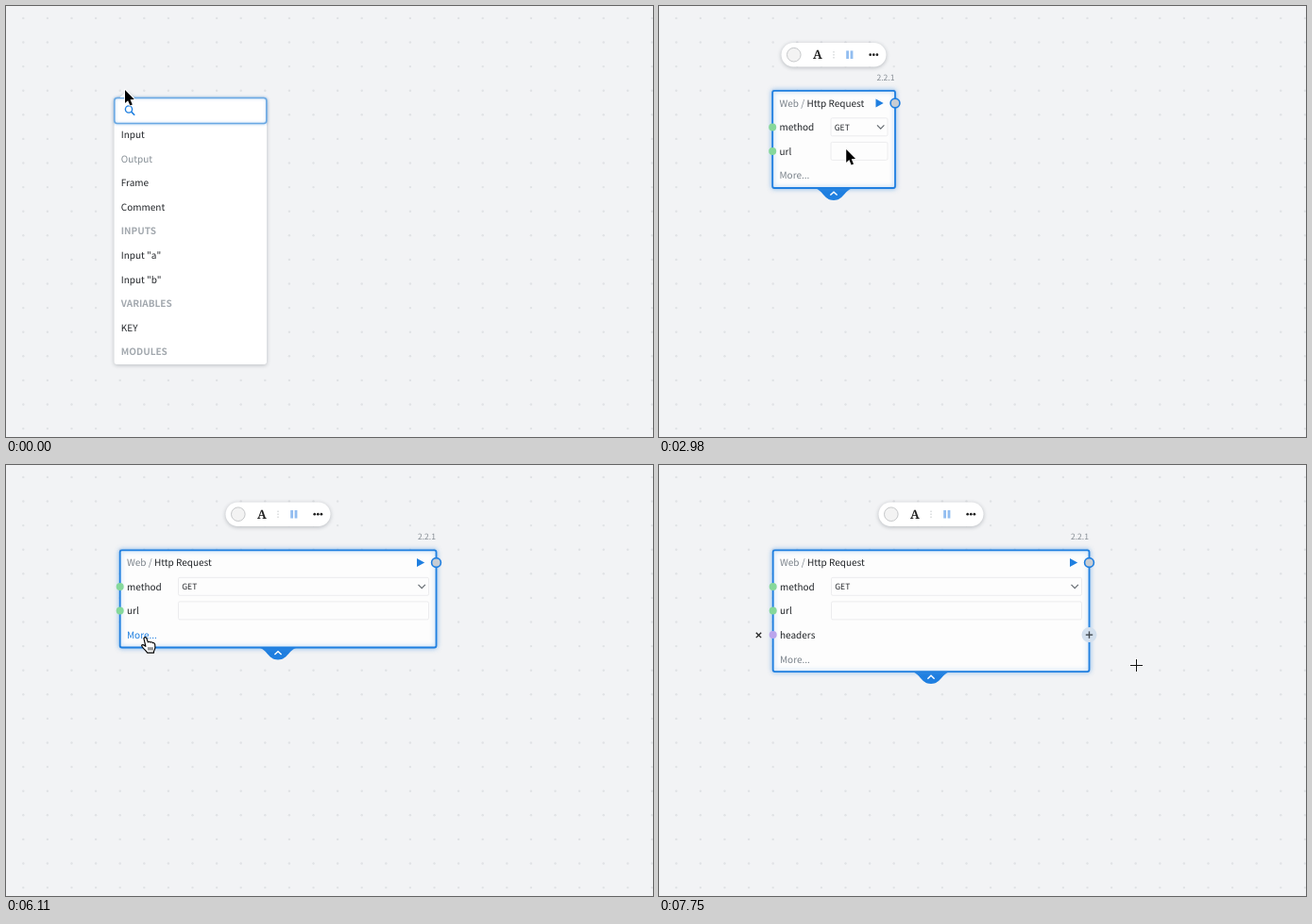
An HTML page with a canvas that plays this animation: 685 px wide and 457 px high, repeating every 8 s.

```html
<!DOCTYPE html>
<html lang="en">
<head>
<meta charset="utf-8">
<title>Node editor</title>
<style>
  html, body { margin: 0; width: 100%; height: 100%; overflow: hidden; background: #f2f3f5; }
  canvas { display: block; width: 685px; height: 457px; }
</style>
</head>
<body>
<canvas id="stage"></canvas>
<script>
const W = 685, H = 457, LOOP = 8000, ROW = 25.6;
const BLUE = '#1f7fe0', DARK = '#222529', GREY = '#7a828a', PALE = '#a2a8ae';
const SANS = '"Noto Sans CJK JP", "Noto Sans CJK SC", "Noto Sans CJK", "Noto Sans", sans-serif';
const canvas = document.getElementById('stage');
const ctx = canvas.getContext('2d');
const dpr = window.devicePixelRatio || 1;
canvas.width = Math.round(W * dpr);
canvas.height = Math.round(H * dpr);

// ---------- helpers ----------

// Text centred on y; parts between asterisks are bold. Returns the end x.
function text(str, x, y, { size = 10, color = DARK, bold = false, right = false, gap = 0 } = {}) {
  ctx.fillStyle = color;
  ctx.wordSpacing = gap + 'px';
  str.split('*').forEach((part, i) => {
    ctx.font = `${bold || i % 2 ? 700 : 400} ${size}px ${SANS}`;
    const w = ctx.measureText(part).width;
    ctx.fillText(part, right ? x - w : x, y + size * 0.38);
    x += w;
  });
  ctx.wordSpacing = '0px';
  return x;
}

function box(x, y, w, h, r, fill, stroke, line = 1) {
  ctx.beginPath();
  ctx.roundRect(x, y, w, h, r);
  paint(fill, stroke, line);
}

function disc(x, y, r, fill, stroke, line = 1) {
  ctx.beginPath();
  ctx.arc(x, y, r, 0, Math.PI * 2);
  paint(fill, stroke, line);
}

function paint(fill, stroke, line) {
  if (fill) { ctx.fillStyle = fill; ctx.fill(); }
  if (stroke) { ctx.strokeStyle = stroke; ctx.lineWidth = line; ctx.stroke(); }
}

function poly(points, fill, stroke, line, close = true) {
  ctx.beginPath();
  points.forEach(([x, y]) => ctx.lineTo(x, y));
  if (close) ctx.closePath();
  paint(fill, stroke, line);
}

function shadow(color, blur, dy, draw) {
  ctx.save();
  ctx.shadowColor = color;
  ctx.shadowBlur = blur * dpr;
  ctx.shadowOffsetY = dy * dpr;
  draw();
  ctx.restore();
}

const mix = (a, b, u) => a + (b - a) * u;
const easeOut = u => 1 - (1 - u) * (1 - u);

// Progress in n held steps, the first one landing at start.
function steps(t, start, end, n) {
  if (t < start) return 0;
  const k = Math.floor((t - start + 1) / ((end - start) / (n - 1))) + 1;
  return Math.min(1, k / n);
}

function curve(a, c, b, u) {
  return [0, 1].map(i => mix(mix(a[i], c[i], u), mix(c[i], b[i], u), u));
}

const line = (a, b, u) => [mix(a[0], b[0], u), mix(a[1], b[1], u)];

// ---------- cursors ----------

const cursors = {
  arrow() {
    const shape = [[0, 0], [0, 14], [3.1, 11.2], [5.4, 16.5], [7.8, 15.5], [5.5, 10.3], [9.8, 10]];
    poly(shape, '#000', '#fff', 1.8);
    poly(shape, '#000');
  },
  cross() {
    ctx.fillStyle = 'rgba(255,255,255,.8)';
    ctx.fillRect(-7, -1, 14, 3);
    ctx.fillRect(-1, -7, 3, 14);
    ctx.fillStyle = '#111';
    ctx.fillRect(-6, 0, 13, 1);
    ctx.fillRect(0, -6, 1, 13);
  },
  hand() {
    ctx.beginPath();
    ctx.moveTo(-1.6, 1.2);
    ctx.quadraticCurveTo(-0.3, -1, 1.2, 0.7);
    ctx.lineTo(2.8, 5.2);
    ctx.quadraticCurveTo(4, 3.9, 5.3, 5.3);
    ctx.quadraticCurveTo(6.9, 4.5, 8, 6);
    ctx.quadraticCurveTo(9.8, 5.5, 10.2, 7.6);
    ctx.lineTo(10.4, 11);
    ctx.quadraticCurveTo(10, 13.5, 9, 14.8);
    ctx.lineTo(9, 16.4);
    ctx.lineTo(2.2, 16.4);
    ctx.quadraticCurveTo(0.5, 14, -1.5, 12.2);
    ctx.quadraticCurveTo(-3.8, 9.8, -3.9, 8.5);
    ctx.quadraticCurveTo(-2.6, 7.3, -0.8, 8.8);
    ctx.lineTo(0.4, 9.6);
    ctx.closePath();
    paint('#fff', '#000', 1.15);
    for (const x of [3.4, 5.4, 7.4]) poly([[x, 10.5], [x + 0.1, 13.8]], null, '#000', 0.8, false);
  }
};

function cursorAt(t) {
  if (t < 1790) {
    const u = steps(t, 600, 890, 3);
    return ['arrow', ...(t < 1640 ? line([126, 89], [159, 113], easeOut(u)) : [159, 116])];
  }
  if (t < 2980) return ['arrow', ...line([159, 116], [175, 140], steps(t, 2090, 2530, 4))];
  if (t < 4170) return ['arrow', ...line([175, 140], [251, 179], easeOut(steps(t, 2980, 3720, 6)))];
  if (t < 5520) return ['cross', ...curve([270, 180], [498, 184], [461, 183], dragAt(t))];
  if (t < 6410) {
    const u = steps(t, 5520, 6110, 5);
    return [u < 1 ? 'arrow' : 'hand', ...line([461, 183], [147.5, 182.7], easeOut(u))];
  }
  if (t < 7750) {
    const p = curve([147, 180], [590, 290], [504, 213], steps(t, 6710, 7300, 5));
    return [p[0] > 456 ? 'hand' : 'arrow', ...p];
  }
  return ['cross', 505, 212];
}

function dragAt(t) {
  return steps(t, 4320, 5070, 6);
}

function drawCursor([kind, x, y]) {
  ctx.save();
  ctx.translate(kind === 'cross' ? Math.round(x) : x, kind === 'cross' ? Math.round(y) : y);
  ctx.lineJoin = 'round';
  cursors[kind]();
  ctx.restore();
}

// ---------- scene ----------

function grid() {
  ctx.fillStyle = '#f2f3f5';
  ctx.fillRect(0, 0, W, H);
  for (let x = 18.3; x < W; x += ROW)
    for (let y = 12.9; y < H; y += ROW) disc(x, y, 1.2, '#e0e2e5');
}

const START = ['Input', '-Output', 'Frame', 'Comment', '#INPUTS', 'Input "a"', 'Input "b"', '#VARIABLES', 'KEY', '#MODULES'];
const ROUGH = [
  ['Web / Http *Re*quest', 'fetch'],
  ['Web / Fetch', 'http *re*quest'],
  ['Array / *Re*verse', 'flip order'],
  ['Array / *Re*duce', 'fold accumulate'],
  ['Text / *Re*place', 'substitute'],
  ['Math / *R*ound', 'nearest whole number'],
  ['Logic / Compa*re*', '']
];
const FOUND = [
  ['Web / Http *Req*uest', 'fetch'],
  ['Web / Fetch', 'http *req*uest'],
  ['A*r*ray / Slic*e*', 'subsequence sublist'],
  ['Logic / Compa*re*', 'compare greater less than equals']
];

function results(list) {
  list.forEach(([name, hint], i) => {
    const y = 136.3 + i * 38.4;
    text(name, 121.8, y);
    text(hint, 121.8, y + 13, { size: 8.5, color: '#8c9298', gap: 1.1 });
  });
}

function search(t) {
  const query = t < 1190 ? '' : t < 1340 ? 'r' : t < 1640 ? 're' : 'req';
  const found = query === 'req';
  const bottom = found ? 277 : 380;
  shadow('rgba(40,50,60,.28)', 4, 1, () => {
    box(114.5, 98, 161.5, bottom - 98, 3, '#fff');
    poly([[119.5, 98], [128, 90.5], [136.5, 98]], '#fff');
  });
  ctx.save();
  ctx.beginPath();
  ctx.rect(115, 97, 161, bottom - 97);
  ctx.clip();
  if (found) {
    ctx.fillStyle = '#f1f2f4';
    ctx.fillRect(115, 125, 161, 37);
    results(FOUND);
  } else if (query) {
    results(ROUGH);
  } else {
    START.forEach((s, i) => {
      const head = s[0] === '#', off = s[0] === '-';
      const color = head ? PALE : off ? '#858e95' : DARK;
      text(s.replace(/^[#-]/, ''), 121.8, 136.2 + i * ROW, { color, bold: head });
    });
  }
  ctx.restore();
  shadow('rgba(60,140,220,.4)', 3, 0, () => box(114.8, 97.6, 161, 27, 3, '#fff', '#69a8e3', 1.5));
  poly([[120.5, 97], [128, 90.5], [135.5, 97]], '#fff');
  disc(130, 109.5, 3.6, null, BLUE, 1.4);
  poly([[132.6, 112.1], [136.2, 115.7]], null, BLUE, 1.6, false);
  if (query) {
    const end = text(query, 144, 110.8);
    ctx.fillStyle = '#111';
    ctx.fillRect(end, 104.5, 1, 12.5);
  }
}

function toolbar(cx) {
  const y = 51.7;
  shadow('rgba(40,50,60,.3)', 4, 1, () => box(cx - 55.5, 39, 111, 25.6, 12.8, '#fff'));
  disc(cx - 42.2, y, 7.3, '#f3f3f3', '#c6c8ca');
  ctx.fillStyle = '#222';
  ctx.font = '700 13px "Noto Serif", "Liberation Serif", serif';
  ctx.textAlign = 'center';
  ctx.fillText('A', cx - 17, y + 4.6);
  ctx.textAlign = 'left';
  ctx.fillStyle = '#c4c7ca';
  for (let i = -1; i < 2; i++) ctx.fillRect(cx - 0.5, y + i * 3 - 0.7, 1, 1.5);
  ctx.fillStyle = '#92bdf0';
  ctx.fillRect(cx + 13.2, y - 4.3, 2.8, 8.6);
  ctx.fillRect(cx + 17.6, y - 4.3, 2.8, 8.6);
  for (let i = -1; i < 2; i++) disc(cx + 42.3 + i * 3.6, y, 1.35, '#222');
}

function field(y, right) {
  box(182, y - 9.6, right - 190, 19, 1.5, '#fdfdfd', '#ececee');
}

function node(t, overMore) {
  const u = easeOut(dragAt(t));
  const right = mix(250, 455, u), cx = (120 + right) / 2;
  const extra = t >= 7750;
  const bottom = 193 + (extra ? ROW : 0);
  const shift = u > 0 ? 0.5 : 0;
  ctx.save();
  ctx.translate(shift, shift);

  toolbar(cx);
  text('2.2.1', right - 0.5, 75.4, { size: 8.6, color: '#858c93', right: true });

  ctx.beginPath();
  ctx.moveTo(cx - 22, bottom);
  ctx.bezierCurveTo(cx - 11, bottom + 1, cx - 11, bottom + 13, cx, bottom + 13);
  ctx.bezierCurveTo(cx + 11, bottom + 13, cx + 11, bottom + 1, cx + 22, bottom);
  paint(BLUE);
  shadow('rgba(70,150,230,.55)', 5, 0,
    () => box(120.2, 89.8, right - 120.2, bottom - 89.8, 2, '#fdfdfd', BLUE, 1.8));
  poly([[cx - 3.6, bottom + 7.6], [cx, bottom + 4.2], [cx + 3.6, bottom + 7.6]], null, '#fff', 1.4, false);

  const x = text('Web / ', 127.5, 103, { color: GREY });
  text('Http Request', x, 103);
  poly([[right - 20.5, 98.5], [right - 12.3, 103], [right - 20.5, 107.5]], BLUE);
  disc(right, 103, 4.9, '#c8cdd3', BLUE, 1.6);

  disc(120.2, 128.4, 4, '#86d89a');
  text('method', 127.5, 128.4);
  field(128.4, right);
  text('GET', 185.7, 128.4, { size: 8.6 });
  poly([[right - 19, 126.4], [right - 15.3, 130.2], [right - 11.6, 126.4]], null, '#666c72', 1.2, false);

  disc(120.2, 154, 4, '#86d89a');
  text('url', 127.5, 154);
  field(154, right);

  if (extra) {
    const y = 179.6;
    disc(120.2, y, 4, '#bba5ec');
    text('headers', 127.5, y);
    for (const s of [-1, 1])
      poly([[105 - 2.7, y + 0.3 - 2.7 * s], [105 + 2.7, y + 0.3 + 2.7 * s]], null, '#222', 1.3, false);
    disc(right, y, 8, '#d3e0ee');
    ctx.fillStyle = '#444b53';
    ctx.fillRect(right - 3.7, y - 0.7, 7.4, 1.4);
    ctx.fillRect(right - 0.7, y - 3.7, 1.4, 7.4);
  }
  text('More...', 127.5, 179.6 + (extra ? ROW : 0), { color: overMore ? BLUE : GREY });
  ctx.restore();
}

const OPTIONS = ['query', 'headers', 'body', 'responseType', 'followRedirects', 'proxyUrl', 'throw', 'retries', 'ca'];

function popup([, cx, cy]) {
  ctx.fillStyle = 'rgba(0,0,0,.1)';
  ctx.fillRect(0, 0, W, H);
  shadow('rgba(30,40,50,.32)', 4, 1, () => {
    box(456, 167, 128.3, 243, 3, '#fff');
    poly([[456.5, 171.5], [448, 180], [456.5, 188.5]], '#fff');
  });
  ctx.fillStyle = '#fff';
  ctx.fillRect(456, 170, 3, 20);
  OPTIONS.forEach((name, i) => {
    const y = 186.3 + i * ROW;
    if (cx > 456 && Math.abs(cy - y) <= ROW / 2) {
      ctx.fillStyle = '#e7f1fb';
      ctx.fillRect(456, y - 12.8, 128.3, ROW);
    }
    text(name, 462.3, y);
  });
}

function draw(t) {
  ctx.setTransform(dpr, 0, 0, dpr, 0, 0);
  ctx.textRendering = 'geometricPrecision';
  const cursor = cursorAt(t);
  const open = t >= 6410 && t < 7750;
  grid();
  if (t < 2090) search(t);
  else node(t, cursor[0] === 'hand' && !open);
  if (open) popup(cursor);
  drawCursor(cursor);
}

const begin = performance.now();
function tick() {
  draw((performance.now() - begin) % LOOP);
  requestAnimationFrame(tick);
}
tick();
</script>
</body>
</html>
```
